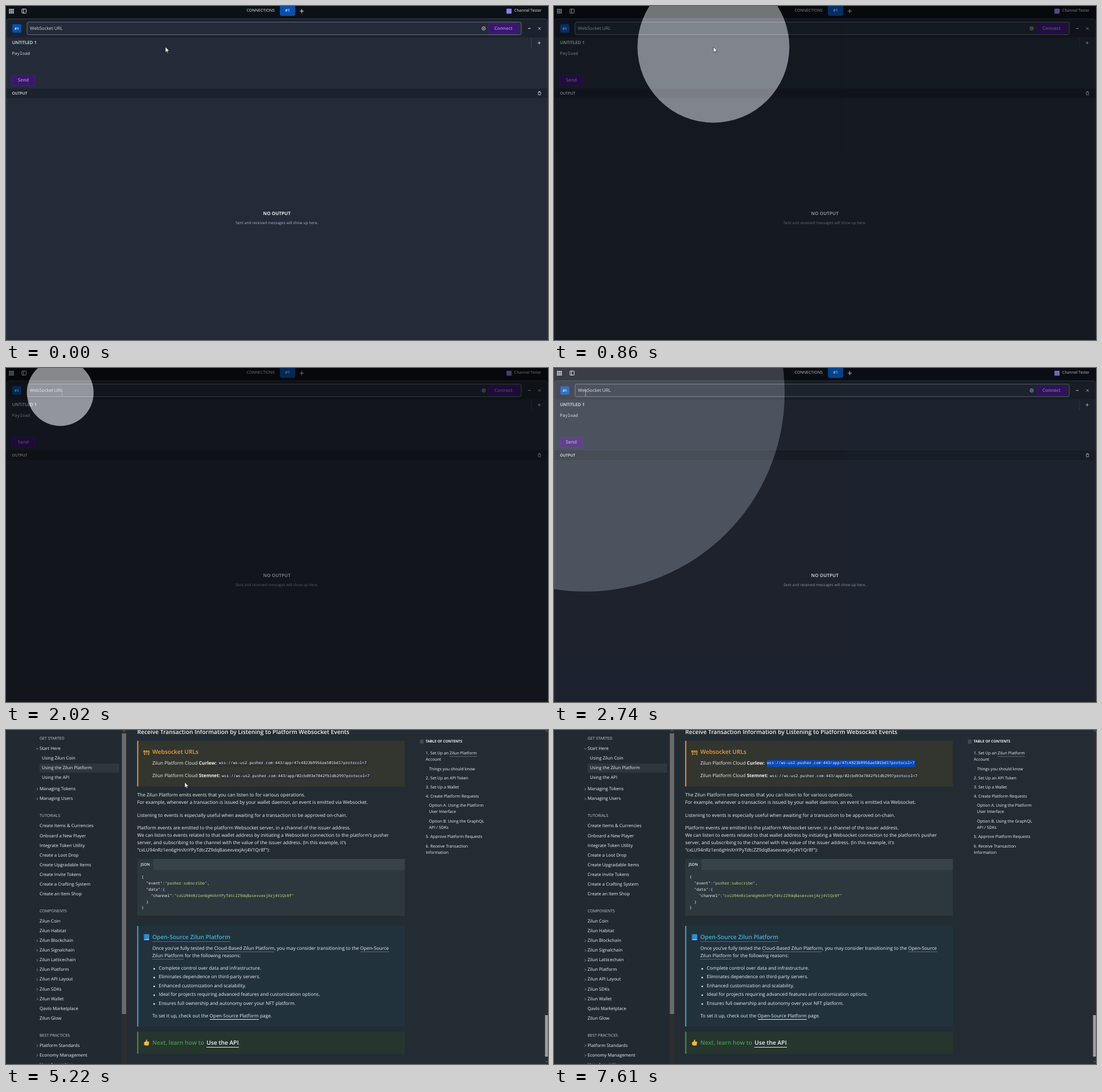
Write an HTML page that moves like this. It is 952 px wide and 588 px high and loops after 8 s.

```html
<!DOCTYPE html>
<html lang="en">
<head>
<meta charset="utf-8">
<title>WebSocket walkthrough</title>
<style>
  html, body { margin: 0; width: 100%; height: 100%; overflow: hidden; background: #0c1017; }
  .layer { position: absolute; left: 0; top: 0; width: 952px; height: 588px; overflow: hidden; }
  .layer span {
    position: absolute; white-space: pre; line-height: 0;
    font-family: "Open Sans", "Noto Sans", sans-serif; text-rendering: geometricPrecision;
  }
  .layer span.mono { font-family: "Noto Sans Mono", "DejaVu Sans Mono", monospace; }
  .layer span.mid { display: flex; width: 0; justify-content: center; }
  b { font-weight: 700; }
  i { font-style: normal; color: #c5dc8c; }
  u { text-decoration: none; border-bottom: 1px solid #5c6870; }
  u.strong { border-color: #e8ecee; }
  #docs { background: #242c33; color: #eef2f4; }
  #client { color: #e6edf3; }
</style>
</head>
<body>
<div class="layer" id="client"></div>
<div class="layer" id="docs"></div>
<svg class="layer" viewBox="0 0 952 588">
  <g id="spotlight">
    <path id="shade" fill-rule="evenodd" fill-opacity=".5"/>
    <circle id="light" fill="#fff" fill-opacity=".5"/>
  </g>
  <path id="arrow" d="M0 0v9.6l2.2-2 1.5 3.3 1.4-.6-1.5-3.2h3z" fill="#fff" stroke="#111" stroke-width=".6"/>
  <path id="beam" d="M-1.7-4.7h1.2l.5.5.5-.5h1.2M0-4.2v8.4M-1.7 4.7h1.2l.5-.5.5.5h1.2" fill="none" stroke="#b4bac2" stroke-width=".8"/>
</svg>
<script>
const $ = id => document.getElementById(id);
const LOOP = 8000, PAGE_SWITCH = 4390;

// Text is placed by its left edge and the vertical middle of its capitals.
const text = (x, y, size, html, style = '', cls = '') =>
  `<span class="${cls}" style="left:${x}px;top:${y}px;font-size:${size}px;${style}">${html}</span>`;
const mono = (x, y, size, html, style) => text(x, y, size, html, style, 'mono');
const middle = (x, y, size, html, style) => text(x, y, size, html, style, 'mid');
const rect = (x, y, w, h, fill, more = '') =>
  `<rect x="${x}" y="${y}" width="${w}" height="${h}" fill="${fill}" ${more}/>`;
const line = (d, color, width = 1) =>
  `<path d="${d}" fill="none" stroke="${color}" stroke-width="${width}"/>`;
const svg = shapes => `<svg class="layer" viewBox="0 0 952 588">${shapes}</svg>`;
const SEMI = 'font-weight:600;';

function buildClient() {
  const icon = '#dce3ea';
  const button = (x, y, w, h) => rect(x, y, w, h, '#3a1670', 'rx="2" stroke="#4d1b91" stroke-width=".8"');
  let grid = '';
  for (let k = 0; k < 9; k++)
    grid += rect(5.2 + k % 3 * 3.1, 5 + Math.floor(k / 3) * 3, 2.3, 2.2, icon);

  const shapes = [
    rect(0, 0, 952, 588, '#0c1017'),
    grid,
    rect(28, 5.3, 7.4, 7.2, 'none', `rx=".8" stroke="${icon}"`),
    line('M30.8 5v8', icon),
    rect(481, -4, 27, 21.5, '#0750ad', 'rx="4"'),
    line('M516 9h7M519.5 5.5v7', icon, 1.1),
    rect(879, 4.8, 9, 8.6, '#8a80ee', 'rx="1"'),
    rect(1, 22.5, 950, 580, '#242b38', 'rx="4" stroke="#37414f"'),
    rect(1.5, 23, 949, 32.5, '#1c222d', 'rx="3.5"'),
    rect(11, 32, 16, 15, '#0750ad', 'rx="2"'),
    rect(37, 28.3, 868, 22.2, '#242b38', 'rx="3" stroke="#65747f"'),
    button(848, 31, 52, 17),
    `<circle cx="839" cy="39.5" r="2.9" fill="none" stroke="${icon}" stroke-width=".9"/>`,
    `<circle cx="839" cy="39.5" r="1" fill="${icon}"/>`,
    line('M917 39.5h4.5', icon, 1.1),
    line('M934.8 37.3l4.4 4.4m0-4.4l-4.4 4.4', icon, .9),
    line('M922.8 56v18', '#3a4453'),
    line('M934 65h5M936.5 62.5v5', icon, .9),
    button(10.5, 122, 40, 18.5),
    rect(1.5, 145, 949, 17, '#1c222d'),
    line('M934.3 151.7h5.4M936 151.5v-.9h2v.9M935 152v4.4h4V152', icon, .8),
  ].join('');

  const faded = 'color:#a197bd;' + SEMI;
  $('client').innerHTML = svg(shapes) + [
    text(422.8, 9, 7, 'CONNECTIONS'),
    middle(494.6, 9, 7, '#1', SEMI),
    text(892.8, 9, 6.9, 'Channel Tester'),
    middle(18.7, 39.5, 6.2, '#1', 'font-weight:700'),
    text(42, 39.5, 7.95, 'WebSocket URL', 'color:#cddbe4'),
    middle(873.7, 39.5, 8, 'Connect', faded),
    text(10.8, 64.7, 7.65, 'UNTITLED 1', SEMI),
    mono(10.6, 84, 7.5, 'Payload', 'color:#d3dbe2'),
    middle(30.5, 131.2, 8.1, 'Send', faded),
    text(10.5, 153.8, 6.7, 'OUTPUT', SEMI),
    middle(475.7, 366.3, 8.1, 'NO OUTPUT', 'font-weight:700'),
    middle(475.7, 382, 6.66, 'Sent and received messages will show up here.', 'color:#adb3c5'),
  ].join('');
}

function buildDocs() {
  const WALLET = 'cxLU94nRz1en6gHnXnYPyTdtcZZ9dqBasexvexjArj4V1Qr8f';
  const HOST = 'wss://ws-us2.pusher.com:443/app/';
  const BODY = 8.3, HEAD = 10.25, CODE = 6.87;
  let shapes = '', words = '';

  const callout = (y, h, fill, edge) => rect(230.5, y, 470, h, fill) + rect(230.5, y, 1.8, h, edge);
  shapes += [
    rect(0, 0, 203, 588, '#222a31'),
    rect(203, 0, 9, 588, '#2b2d2e'), rect(203.5, 6, 7.5, 494, '#696c6d'),
    line('M205.5 2.5l1.8-2 1.8 2', '#8d9091', .8),
    rect(946, 0, 6, 588, '#2c2c2c'), rect(946.8, 502, 5, 73, '#9f9f9f'),
    line('M948 2.5l1.5-1.5 1.5 1.5M948 583l1.5 1.5 1.5-1.5', '#9f9f9f', .8),
    rect(59, 59, 140, 16, '#2d373d', 'rx="2"'),
    callout(19, 80.5, '#33352f', '#eda23a'),
    callout(345, 177, '#22323d', '#45b5d3'),
    callout(531, 39, '#27352f', '#43a04a'),
    rect(372, 54.5, 264, 9.5, '#2b3134', 'rx="1.5"'),
    rect(377, 76.5, 264, 9.5, '#2b3134', 'rx="1.5"'),
    '<rect id="selection" x="373.7" y="53" height="12.3" fill="#0b49b8"/>',
    rect(230.5, 227, 470, 100, '#2d383e'), rect(259, 227, 441.5, 19.5, '#374249'),
    line('M727 18h6.5M727 20.4h6.5M727 22.8h6.5', '#7d878d', .8),
    // barrier, book and thumb beside the headings
    rect(241.5, 36, 11, 3.6, '#f0b03c'), line('M243.5 39.5l2-3.5m1.5 3.5l2-3.5m1.2 3.5l2-3.5', '#333', 1.2),
    line('M243.3 39.6v5M250.8 39.6v5M242 42.2h10', '#d99028', 1.1),
    rect(242, 359.5, 9.5, 10.5, '#2f8fd3', 'rx="1"'), line('M243 369h8.2', '#dcebf3', .9), line('M243.6 360v8.5', '#1c6ca8', .9),
    '<path d="M242.5 549.5l2.5-.7 1.6-3.6q2-.4 1.5 1.4l-.5 2h3q1.4.5.6 1.8l-.6 4.2q-.5 1-1.8 1h-3.6q-1.6-.4-2.7-1.7z" fill="#f3b73e"/>',
  ].join('');

  // Prefixes: "v" open branch, ">" closed branch, "." child entry.
  const sidebar = (y, title, entries) => {
    words += text(59, y, 7, title, 'color:#c3cbd0');
    entries.split('|').forEach((entry, k) => {
      const row = y + 17.07 * (k + 1), mark = entry[0];
      if (mark === '>') shapes += line(`M54 ${row - 2}l2 2-2 2`, '#a5aeb3', .8);
      if (mark === 'v') shapes += line(`M53 ${row - 1}l2 2 2-2`, '#a5aeb3', .8);
      words += text(mark === '.' ? 63 : 59, row, 7.8, entry.replace(/^[v>.]/, ''));
    });
  };
  sidebar(16, 'GET STARTED', 'vStart Here|.Using Zilun Coin|.Using the Zilun Platform|.Using the API');
  sidebar(87, '', '>Managing Tokens|>Managing Users');
  sidebar(152.4, 'TUTORIALS', 'Create Items &amp; Currencies|Onboard a New Player|Integrate Token Utility|' +
    'Create a Loot Drop|Create Upgradable Items|Create Invite Tokens|Create a Crafting System|Create an Item Shop');
  sidebar(320, 'COMPONENTS', 'Zilun Coin|Zilun Habitat|>Zilun Blockchain|>Zilun Signalchain|>Zilun Latticechain|' +
    '>Zilun Platform|>Zilun API Layout|>Zilun SDKs|>Zilun Wallet|Qavlo Marketplace|Zilun Glow');
  sidebar(538.5, 'BEST PRACTICES', '>Platform Standards|>Economy Management|>User Acquisition');

  const toc = (x, y, html) => words += text(x, y, 7.2, html);
  words += text(737, 20, 6.35, 'TABLE OF CONTENTS', 'font-weight:700');
  toc(737.3, 41, '1. Set Up an <u>Zilun Platform</u>');
  toc(737.3, 52, 'Account');
  toc(743, 68.5, 'Things you should know');
  toc(737.3, 84.6, '2. Set Up an API Token');
  toc(737.3, 100.8, '3. Set Up a Wallet');
  toc(737.3, 117, '4. Create Platform Requests');
  toc(743, 133.3, 'Option A. Using the Platform');
  toc(743, 144.3, 'User Interface');
  toc(743, 160.8, 'Option B. Using the GraphQL');
  toc(743, 172, 'API / SDKs');
  toc(737.3, 188.4, '5. Approve Platform Requests');
  toc(737.3, 204.5, '6. Receive Transaction');
  toc(737.3, 216, 'Information');

  const body = (x, y, html) => words += text(x, y, BODY, html);
  const head = (x, y, html, color) => words += text(x, y, HEAD, html, SEMI + 'color:' + color);
  const code = (x, y, html) => words += mono(x, y, CODE, html, 'font-weight:500');

  head(230.5, 4, 'Receive Transaction Information by Listening to Platform Websocket Events', '#f2f5f7');
  head(257, 39.3, 'Websocket URLs', '#e9a23b');
  body(257, 59, 'Zilun Platform Cloud <b>Curlew:</b>');
  code(374, 59.3, HOST + '47c4823b9956ae501bd1?protocol=7');
  body(257, 81, 'Zilun Platform Cloud <b>Stemnet:</b>');
  code(379, 81.5, HOST + '02cbd93e7842fb1db299?protocol=7');

  body(230.5, 115.2, 'The Zilun Platform emits events that you can listen to for various operations.');
  body(230.5, 128.4, 'For example, whenever a transaction is issued by your wallet daemon, an event is emitted via Websocket.');
  body(230.5, 150.6, 'Listening to events is especially useful when awaiting for a transaction to be approved on-chain.');
  body(230.5, 172.6, 'Platform events are emitted to the platform Websocket server, in a channel of the issuer address.');
  body(230.5, 185.6, "We can listen to events related to that wallet address by initiating a Websocket connection to the platform's pusher");
  body(230.5, 198.8, "server, and subscribing to the channel with the value of the issuer address. (In this example, it's");
  body(230.5, 212, `"${WALLET}"):`);

  words += text(236.5, 237.3, 6.7, 'JSON', SEMI);
  ['{', '  "event":<i>"pusher:subscribe"</i>,', '  "data":{', `    "channel":<i>"${WALLET}"</i>`, '  }', '}']
    .forEach((row, k) => code(238, 260.3 + 10.8 * k, row));

  head(257, 365.3, '<u>Open-Source Zilun Platform</u>', '#46b6d4');
  body(257, 384.6, 'Once you’ve fully tested the <u>Cloud-Based Zilun Platform</u>, you may consider transitioning to the <u>Open-Source</u>');
  body(257, 397.8, '<u>Zilun Platform</u> for the following reasons:');
  ['Complete control over data and infrastructure.', 'Eliminates dependence on third-party servers.',
    'Enhanced customization and scalability.', 'Ideal for projects requiring advanced features and customization options.',
    'Ensures full ownership and autonomy over your NFT platform.'].forEach((reason, k) => {
    const y = 420 + 15.45 * k;
    shapes += `<circle cx="260.3" cy="${y + .5}" r="1.4" fill="#eef2f4"/>`;
    body(268.3, y, reason);
  });
  body(257, 503.7, 'To set it up, check out the <u class="strong">Open-Source Platform</u> page.');
  head(257, 551, 'Next, learn how to', '#439f48');
  head(352.3, 551, '<u class="strong">Use the API</u><span style="position:static;color:#439f48">.</span>', '#f2f5f7');

  $('docs').innerHTML = svg(shapes) + words;
}

// Pointer path: time, x, y
const POINTER = [
  [0, 280, 72], [1050, 280, 72], [1520, 100, 43], [1800, 58, 43], [2060, 101, 43.5], [2440, 55.5, 44],
  [2750, 55.5, 44], [3200, 110, -14], [4380, 110, -14], [4390, 505, -14], [4690, 505, -14],
  [4990, 222, 62], [5220, 314, 92], [5500, 345, 93], [5600, 358, 22], [5720, 375, 59], [5800, 375, 59],
  [6200, 633, 60], [6290, 622, 73], [7240, 622, 73], [7420, 752, 40], [7600, 425, -16], [LOOP, 425, -16],
];

function pointerAt(t) {
  const k = Math.max(1, POINTER.findIndex(key => key[0] > t));
  const [t0, x0, y0] = POINTER[k - 1], [t1, x1, y1] = POINTER[k];
  const p = Math.max(0, (t - t0) / (t1 - t0)), s = p * p * (3 - 2 * p);
  return [x0 + (x1 - x0) * s, y0 + (y1 - y0) * s];
}

// cubic-bezier(.1, .9, .2, 1)
function easeOut(x) {
  if (x <= 0 || x >= 1) return x <= 0 ? 0 : 1;
  const curve = (a, b, s) => 3 * a * s * (1 - s) ** 2 + 3 * b * s * s * (1 - s) + s ** 3;
  let low = 0, high = 1;
  for (let k = 0; k < 20; k++) {
    const s = (low + high) / 2;
    if (curve(.1, .2, s) < x) low = s; else high = s;
  }
  return curve(.9, 1, low);
}

function drawSpotlight(t) {
  const amount = easeOut((t - 741) / 500) - easeOut((t - 2685) / 500);
  const r = 58.5 * (9 - 8 * amount), [x, y] = pointerAt(t - 20);
  $('spotlight').setAttribute('opacity', amount);
  $('shade').setAttribute('d', `M0 0H952V588H0ZM${x - r} ${y}a${r} ${r} 0 1 0 ${2 * r} 0a${r} ${r} 0 1 0 ${-2 * r} 0Z`);
  for (const [name, value] of [['cx', x], ['cy', y], ['r', r]]) $('light').setAttribute(name, value);
}

function drawPointer(t) {
  const [x, y] = pointerAt(t), inDocs = t >= PAGE_SWITCH;
  const overText = inDocs
    ? y > 53 && y < 66 && x > 257 && x < 640
    : y > 28 && y < 50 && x > 37 && x < 834;
  $('arrow').style.display = overText ? 'none' : '';
  $('beam').style.display = overText ? '' : 'none';
  $(overText ? 'beam' : 'arrow').setAttribute('transform', `translate(${x} ${y})`);
}

function drawSelection(t) {
  const CHAR = 4.127, COUNT = 63;
  const reached = t < 5800 ? 0 : t > 6200 ? COUNT : Math.round((pointerAt(t)[0] - 374) / CHAR);
  $('selection').setAttribute('width', Math.min(COUNT, reached) * CHAR + (reached ? .6 : 0));
}

function frame() {
  const t = performance.now() % LOOP;
  $('docs').style.display = t < PAGE_SWITCH ? 'none' : '';
  drawSpotlight(t);
  drawPointer(t);
  drawSelection(t);
  requestAnimationFrame(frame);
}

buildClient();
buildDocs();
frame();
</script>
</body>
</html>
```
